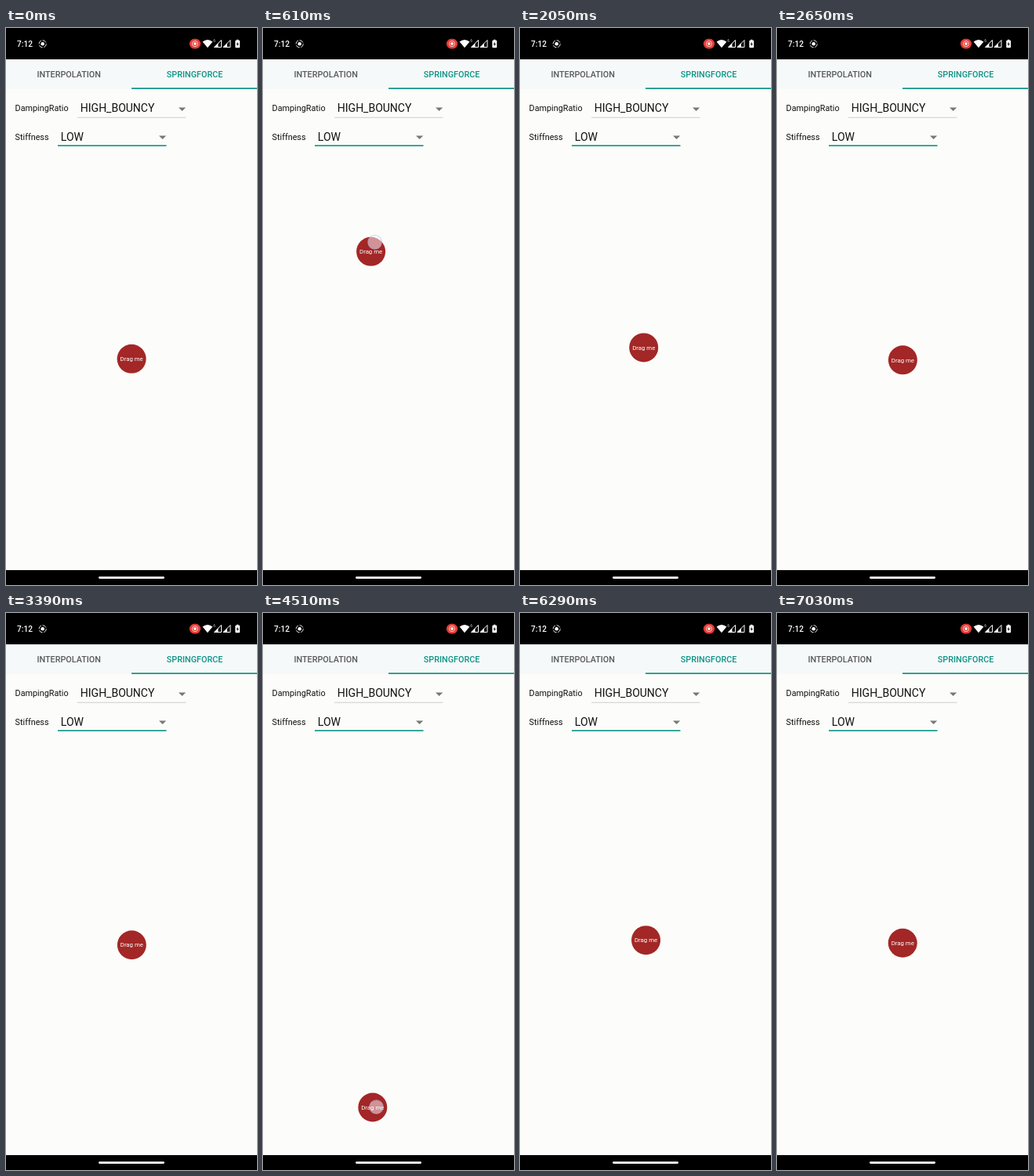
Animation of 320 by 711 pixels, one loop 7050 ms. Source, as an HTML page with a canvas:

```html
<!DOCTYPE html>
<html lang="en">
<head>
<meta charset="utf-8">
<title>Spring force</title>
<style>
html, body { margin: 0; width: 100%; height: 100%; overflow: hidden; background: #fcfcfa; }
canvas { display: block; width: 320px; height: 711px; }
</style>
</head>
<body>
<canvas id="stage"></canvas>
<script>
const W = 320, H = 711, LOOP = 7050;
const TEAL = '#0c9486';
const REST = { x: 160.1, y: 422.3 };
const OMEGA = 0.01133;   // damped frequency, rad per ms
const DECAY = 0.204;     // damping ratio 0.2, per radian of phase

// Each drag: touch down, pull to an offset from rest, hold, release into the spring.
const drags = [
  { down: 40, start: 70, stop: 1160, release: 1372, dx: -31.4, dy: -191, power: 1.85, touch: { x: 5, y: -12 } },
  { down: 3630, start: 3650, stop: 4510, release: 4985, dx: -20.3, dy: 208.7, power: 1.35, touch: { x: 4.7, y: -0.5 } }
];

const canvas = document.getElementById('stage');
const ctx = canvas.getContext('2d');
const scale = window.devicePixelRatio || 1;
canvas.width = W * scale;
canvas.height = H * scale;

const clamp = v => Math.max(0, Math.min(1, v));

function rect(x, y, w, h, color) {
  ctx.fillStyle = color;
  ctx.fillRect(x, y, w, h);
}

function text(str, x, y, size, color, weight = 400, align = 'left') {
  ctx.font = `${weight} ${size}px Roboto, sans-serif`;
  ctx.textAlign = align;
  ctx.fillStyle = color;
  ctx.fillText(str, x, y);
}

function disc(x, y, r, color) {
  ctx.beginPath();
  ctx.arc(x, y, r, 0, Math.PI * 2);
  ctx.fillStyle = color;
  ctx.fill();
}

function ring(x, y, r, color, width) {
  ctx.beginPath();
  ctx.arc(x, y, r, 0, Math.PI * 2);
  ctx.strokeStyle = color;
  ctx.lineWidth = width;
  ctx.stroke();
}

function polygon(points, fill, stroke) {
  ctx.beginPath();
  points.forEach(([x, y]) => ctx.lineTo(x, y));
  ctx.closePath();
  if (fill) {
    ctx.fillStyle = fill;
    ctx.fill();
  }
  if (stroke) {
    ctx.strokeStyle = stroke;
    ctx.lineWidth = 1;
    ctx.stroke();
  }
}

function pill(x, y, w, h, r, color) {
  ctx.beginPath();
  ctx.roundRect(x, y, w, h, r);
  ctx.fillStyle = color;
  ctx.fill();
}

function signal(x) {
  polygon([[x, 24.5], [x + 9, 24.5], [x + 9, 15.5]], null, '#fff');
  polygon([[x, 24.5], [x + 5, 24.5], [x + 5, 19.5]], '#fff');
}

function statusBar() {
  rect(0, 0, W, 40, '#000');
  text('7:12', 14, 24, 10.1, '#fff', 500);

  ctx.setLineDash([5.4, 1.6]);
  ring(46.7, 20.3, 4.6, '#ddd', 1);
  ctx.setLineDash([]);
  disc(46.7, 20.3, 2.3, '#fff');

  pill(233.8, 13.8, 14.4, 12.6, 6.3, '#e53b36');
  ring(241, 20.1, 3.6, '#fbd5d2', 0.9);
  disc(241, 20.1, 1.8, '#fff');

  ctx.beginPath();
  ctx.moveTo(257, 25.3);
  ctx.lineTo(250.6, 17.6);
  ctx.quadraticCurveTo(257, 12.6, 263.4, 17.6);
  ctx.closePath();
  ctx.fillStyle = '#fff';
  ctx.fill();

  text('6', 264.2, 17.8, 5, '#ccc');
  signal(265.5);
  signal(277);

  pill(292.3, 15.8, 5.8, 9.4, 1, '#fff');
  rect(294, 14.8, 2.4, 1.4, '#fff');
  polygon([[295.7, 17.4], [293.7, 21], [295, 21], [294.8, 23.6], [296.8, 20], [295.5, 20]], '#000');
}

function spinner(label, value, x, labelY, valueY, lineY, active) {
  text(label, 11.6, labelY, 10.8, '#111');
  text(value, x + 3.8, valueY, 14, '#111');
  const lineH = active ? 1.6 : 0.8;
  rect(x, lineY - lineH / 2, 138.5, lineH, active ? TEAL : '#c4c4c4');
  const arrowY = lineY - 12.7;
  polygon([[x + 129, arrowY], [x + 138.2, arrowY], [x + 133.6, arrowY + 4.6]], '#777');
}

function screen() {
  rect(0, 0, W, H, '#fcfcfa');
  statusBar();
  rect(0, 40, W, 38, '#f6f9fa');
  text('INTERPOLATION', 80.2, 62.8, 10.8, '#58595a', 500, 'center');
  text('SPRINGFORCE', 240.6, 62.8, 10.8, TEAL, 500, 'center');
  rect(160, 76.3, 160, 1.7, TEAL);

  spinner('DampingRatio', 'HIGH_BOUNCY', 91, 106.3, 107.4, 114.2, false);
  spinner('Stiffness', 'LOW', 66, 142.7, 143.7, 150.2, true);

  rect(0, 692, W, 19, '#000');
  pill(118, 700.2, 84, 2.8, 1.4, '#fff');
}

// Fraction of the full pull offset at time t.
function pull(drag, t) {
  if (t > drag.release) {
    const phase = (t - drag.release) * OMEGA;
    return Math.exp(-DECAY * phase) * (Math.cos(phase) + DECAY * Math.sin(phase));
  }
  const u = clamp((t - drag.start) / (drag.stop - drag.start));
  return 1 - Math.pow(1 - u * u * (3 - 2 * u), drag.power);
}

function ball(x, y) {
  disc(x, y, 18.5, '#a22726');
  text('Drag me', x, y + 2.7, 7.8, '#fff', 400, 'center');
}

function touchDot(drag, t) {
  if (t < drag.down) return;
  const alpha = clamp(1 - (t - drag.release) / 240);
  if (alpha === 0) return;
  const held = pull(drag, Math.min(t, drag.release));
  const x = REST.x + drag.dx * held + drag.touch.x;
  const y = REST.y + drag.dy * held + drag.touch.y;
  ctx.globalAlpha = alpha;
  disc(x, y, 8.6, 'rgba(255,255,255,0.5)');
  ring(x, y, 8.8, 'rgba(190,185,240,0.65)', 1.1);
  ctx.globalAlpha = 1;
}

function draw(t) {
  ctx.setTransform(scale, 0, 0, scale, 0, 0);
  screen();
  const drag = t < drags[1].down ? drags[0] : drags[1];
  const amount = pull(drag, t);
  ball(REST.x + drag.dx * amount, REST.y + drag.dy * amount);
  touchDot(drag, t);
}

const begin = performance.now();
function tick() {
  draw((performance.now() - begin) % LOOP);
  requestAnimationFrame(tick);
}
tick();
</script>
</body>
</html>
```
